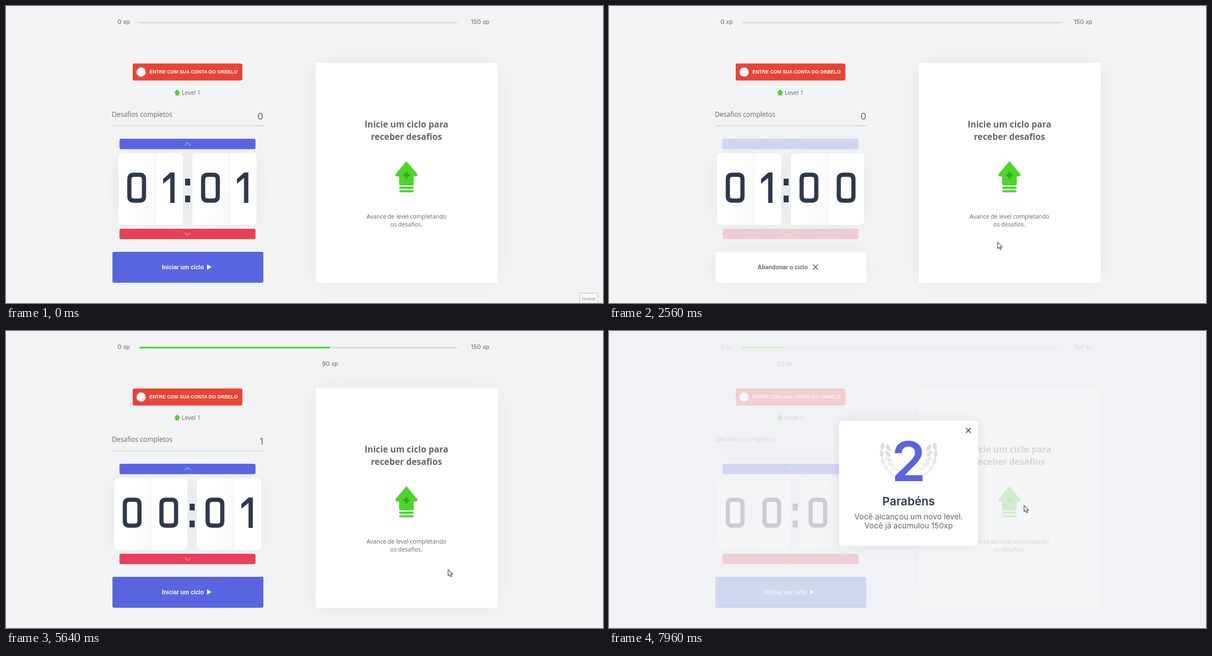
Write an HTML page that moves like this. It is 1060 by 528 pixels and loops after 8 s.

```html
<!DOCTYPE html>
<html lang="pt-BR">
<head>
<meta charset="utf-8">
<title>Ciclos e desafios</title>
<style>
html, body { margin: 0; width: 100%; height: 100%; overflow: hidden; background: #f2f3f5; }
#stage { position: relative; width: 1060px; height: 528px; overflow: hidden; background: #f2f3f5; }
#stage > * { position: absolute; }
#stage > svg { left: 0; top: 0; }
.shadow { box-shadow: 0 0 35px rgba(0, 0, 0, .05); }
#card { left: 549.5px; top: 101px; width: 323.5px; height: 390.5px; background: #fff; }
#cycle { left: 188.5px; top: 436.5px; width: 268.5px; height: 55px; border-radius: 3px; }
#timer { left: 0; top: 262px; width: 645px; height: 126.5px; display: flex; justify-content: center; }
.pair { display: flex; border-radius: 7px; background: #fff; overflow: hidden; }
.cell { position: relative; height: 100%; width: 65px; box-sizing: border-box; }
.cell.one { width: 48.75px; }
.cell:first-child { background: linear-gradient(100deg, #fff 45%, #f8f8f9); }
.cell + .cell { border-left: 1px solid #eeeff1; }
.cell svg { position: absolute; top: 34px; left: 15px; overflow: visible; }
.cell + .cell svg { left: 14.5px; }
.cell.one svg { left: 12.5px; }
.colon { position: relative; width: 17.3px; }
.colon i { position: absolute; left: 4.4px; width: 8.5px; height: 12px; background: #2e384d; }
text { font-family: "Open Sans", "Noto Sans", sans-serif; fill: #666; }
.inter { font-family: Inter, sans-serif; }
.arial { font-family: "Liberation Sans", Arial, sans-serif; font-weight: bold; }
.mid { text-anchor: middle; }
.end { text-anchor: end; }
</style>
</head>
<body>
<div id="stage">
  <div id="card" class="shadow"></div>
  <div id="timer"></div>
  <div id="cycle"></div>

  <svg width="1060" height="528">
    <defs>
      <g id="arrowUp">
        <path d="M20 1.5L38.5 23.5Q39 26 36.5 26H32V40Q32 42 30 42H10Q8 42 8 40V26H3.5Q1 26 1.5 23.5Z" fill="#4cd62b" stroke="#4cd62b" stroke-width="2" stroke-linejoin="round"/>
      </g>
    </defs>

    <text class="inter" font-size="11" x="198" y="32">0 <tspan font-size="10">xp</tspan></text>
    <text class="inter end" font-size="11" x="858" y="32">150 <tspan font-size="10">xp</tspan></text>
    <rect x="236.5" y="28" width="564.5" height="3" rx="1.5" fill="#dcdde0"/>
    <rect id="bar" x="236.5" y="28" height="3" rx="1.5" fill="#4cd62b"/>
    <text id="gain" class="inter mid" font-size="11" y="61.5"><tspan id="gainNum"></tspan> <tspan font-size="10">xp</tspan></text>

    <rect x="225" y="102.3" width="194.7" height="30.3" rx="3" fill="#ea4335"/>
    <circle cx="240" cy="117.5" r="8.2" fill="#fff"/>
    <text class="arial" font-size="8.5" x="254.8" y="120" style="fill:#fff">ENTRE COM SUA CONTA DO ORBELO</text>

    <use href="#arrowUp" transform="translate(298.8 147.8) scale(.26)"/>
    <text id="level" font-size="10.4" x="312" y="158"></text>

    <text font-size="11.75" x="188" y="196.5">Desafios completos</text>
    <text id="count" class="inter end" font-size="16.5" x="457" y="202"></text>
    <path d="M188 213H457" stroke="#c6c7ca" stroke-width="1.2"/>

    <g id="steps">
      <rect x="201.5" y="236" width="241.5" height="18.5" rx="3" fill="#5965e0"/>
      <path d="M317.5 247.8L322.3 243L327.1 247.8" fill="none" stroke="#3ec8f2" stroke-width="1.6"/>
      <rect x="201.5" y="396" width="241.5" height="18.5" rx="3" fill="#e83f5b"/>
      <path d="M317.5 403.3L322.3 408L327.1 403.3" fill="none" stroke="#f5a43c" stroke-width="1.6"/>
    </g>

    <g id="idleLabel">
      <text class="arial" font-size="10.2" x="277" y="467.5" style="fill:#fff">Iniciar um ciclo</text>
      <path d="M357 459.3L365 464L357 468.7Z" fill="#fff"/>
    </g>
    <g id="activeLabel">
      <text class="arial" id="quit" font-size="10.2" x="264" y="467.5">Abandonar o ciclo</text>
      <path id="quitX" d="M362.3 459.8L371 468.5M371 459.8L362.3 468.5" stroke-width="1.6"/>
    </g>
    <g id="doneLabel">
      <rect x="188.5" y="491" width="268.5" height="3" fill="#4cd62b"/>
      <text class="arial" font-size="10.2" x="270" y="467.5">Ciclo encerrado</text>
      <circle cx="363" cy="464" r="5.5" fill="#4cd62b"/>
      <path d="M360.3 464.2L362.3 466.2L365.8 462" fill="none" stroke="#fff" stroke-width="1.3"/>
    </g>

    <g id="waiting">
      <g font-size="15.4" font-weight="bold" class="mid">
        <text x="711" y="215.7">Inicie um ciclo para</text>
        <text x="711" y="237.7">receber desafios</text>
      </g>
      <use href="#arrowUp" x="691" y="276"/>
      <path d="M711 295.5V306.5M705.5 301H716.5" stroke="#36a81e" stroke-width="4"/>
      <path d="M700 323H722M700 329.3H722" stroke="#4cd62b" stroke-width="3.8" stroke-linecap="round"/>
      <g font-size="10.45" class="mid">
        <text x="711" y="377.5">Avance de level completando</text>
        <text x="711" y="391.8">os desafios.</text>
      </g>
    </g>

    <g id="challenge" class="mid">
      <text id="prize" class="inter" font-size="13" font-weight="600" x="711" y="170" style="fill:#5965e0"></text>
      <path d="M580 187H842" stroke="#dcdde0"/>
      <path d="M694 234H728" stroke="#4cd62b" stroke-width="5"/>
      <path d="M692 219V249M730 219V249" stroke="#4cd62b" stroke-width="8" stroke-linecap="round"/>
      <path d="M683 227V241M739 227V241" stroke="#36a81e" stroke-width="5" stroke-linecap="round"/>
      <text font-size="15.4" font-weight="bold" x="711" y="288">Novo desafio</text>
      <g font-size="10.45">
        <text x="711" y="314">Estique um de seus braços com a palma</text>
        <text x="711" y="329">da mão virada para frente e puxe os</text>
        <text x="711" y="344">dedos para cima por 10 segundos.</text>
      </g>
      <rect x="580" y="406" width="127" height="27" rx="3" fill="#e83f5b"/>
      <rect x="715" y="406" width="127" height="27" rx="3" fill="#4cd62b"/>
      <g font-size="9.5">
        <text class="arial" x="643.5" y="423" style="fill:#fff">Falhei</text>
        <text class="arial" x="778.5" y="423" style="fill:#fff">Completei</text>
      </g>
    </g>

    <g id="tip">
      <rect x="1018.5" y="510.5" width="32.5" height="22" rx="1" fill="#f7f7f8" stroke="#c4c4c6"/>
      <text x="1022.8" y="523" font-size="8" class="arial" style="font-weight:normal;fill:#8a8a8a">Gravar</text>
    </g>
  </svg>

  <svg width="1060" height="528">
    <g id="modal">
      <rect width="1060" height="528" fill="#f2f3f5" opacity=".8"/>
      <rect x="408.5" y="159.5" width="247" height="222.5" rx="6" fill="#fff" style="filter:drop-shadow(0 0 9px rgba(0,0,0,.09))"/>
      <path d="M633.8 172.3L642.6 181.1M642.6 172.3L633.8 181.1" stroke="#555" stroke-width="1.6"/>
      <g id="laurel"></g>
      <g class="mid">
        <text class="inter" x="532" y="267" font-size="98" font-weight="600" style="fill:#5965e0">2</text>
        <text class="inter" x="532" y="310" font-size="20.5" font-weight="600" style="fill:#2e384d">Parabéns</text>
        <text class="inter" x="532" y="334.7" font-size="13.7">Você alcançou um novo level.</text>
        <text class="inter" x="532" y="351.3" font-size="13.7">Você já acumulou 150xp</text>
      </g>
    </g>
    <g id="cursor" stroke-linejoin="round">
      <path id="arrow" d="M0 0V11.4L2.7 9L4.6 13L6.5 12.1L4.6 8.3H8.3Z" fill="#fff" stroke="#222"/>
      <path id="hand" d="M-1.4 9V1.2Q-1.2 0 0 0T1.3 1.2V5.4Q2.6 4.6 3.6 5.8Q5 5.2 5.7 6.5Q7.3 6.1 7.3 8V11Q7.3 13 6 15.8H-1.2Q-2 13.2-4.6 10.4Q-5.4 8.6-3.6 8.3Q-2.4 8.2-1.4 9Z" fill="#fff" stroke="#222"/>
    </g>
  </svg>
</div>

<script>
const LOOP = 8000, STEP = 40;
const $ = id => document.getElementById(id);
const show = (id, on) => { $(id).style.display = on ? "" : "none"; };

const BLUE = [89, 101, 224], RED = [232, 63, 91], WHITE = [255, 255, 255];

// time, mode, clock, completed, xp
const STATES = [
  [0, "idle", "01:01", 0, 0],
  [600, "active", "01:01", 0, 0],
  [1600, "active", "01:00", 0, 0],
  [2920, "active", "00:59", 0, 0],
  [3280, "idle", "01:01", 0, 0],
  [3640, "idle", "00:01", 0, 0],
  [3800, "active", "00:01", 0, 0],
  [4800, "done", "00:00", 0, 0],
  [5440, "idle", "00:01", 1, 90],
  [6280, "active", "00:01", 1, 90],
  [7280, "done", "00:00", 1, 90],
  [7760, "levelup", "00:01", 2, 20]
];

// time, colour of the cycle button
const FILL = [
  [600, BLUE], [800, RED], [1110, RED], [1290, WHITE],
  [2960, WHITE], [3120, RED], [3280, RED], [3420, BLUE],
  [3800, BLUE], [3960, RED], [4020, RED], [4190, WHITE],
  [5439, WHITE], [5440, BLUE], [6280, BLUE], [6440, RED],
  [6560, RED], [6740, WHITE], [7759, WHITE], [7760, BLUE]
];

// time, cursor tip
const PATH = [
  [80, [1000, 490]], [200, [820, 400]], [320, [560, 367]], [440, [360, 452]],
  [960, [360, 452]], [1100, [450, 430]], [1200, [832, 270]], [1240, [829.5, 247]],
  [1400, [818, 244]], [1960, [762, 457]], [2200, [762, 457]], [2240, [770, 456]],
  [2480, [770, 456]], [2600, [650, 402]], [2720, [480, 440]], [2880, [480, 440]],
  [3040, [380, 456]], [3280, [346, 458]], [3440, [344, 456]], [3560, [322, 402]],
  [3680, [322, 402]], [3800, [345, 456]], [3960, [380, 452]], [4040, [470, 440]],
  [4240, [857, 360]], [4440, [968, 330]], [4560, [919, 345]], [4600, [919, 345]],
  [5200, [787, 422]], [5640, [785, 424]], [6240, [350, 456]], [6480, [380, 452]],
  [6560, [465, 440]], [6720, [853, 400]], [6880, [804, 410]], [7080, [800, 418]],
  [7480, [786, 420]], [7720, [786, 420]], [7960, [737, 310]]
];

function track(keys, t) {
  const i = keys.findIndex(k => k[0] > t);
  if (i === 0) return keys[0][1];
  if (i < 0) return keys[keys.length - 1][1];
  const [t0, a] = keys[i - 1], [t1, b] = keys[i];
  return a.map((v, n) => v + (b[n] - v) * (t - t0) / (t1 - t0));
}
const rgb = c => `rgb(${c.map(Math.round)})`;

const STROKES = {
  0: "M4 12Q4 4 12 4H22Q30 4 30 12V42Q30 50 22 50H12Q4 50 4 42Z",
  5: "M30 4H5V25Q10 21 18 21Q30 21 30 33V39Q30 50 19 50H14Q5 50 4 41",
  9: "M30 25Q27 30 18 30H14Q4 30 4 19V14Q4 4 14 4H20Q30 4 30 14V28Q30 38 24 50"
};
function digit(d) {
  const shape = d === "1"
    ? '<path d="M0 11.5L13 0H20.3V54H12.6V9.8L0 20Z" fill="#2e384d"/>'
    : `<path d="${STROKES[d]}" fill="none" stroke="#2e384d" stroke-width="7.4"/>`;
  return `<div class="cell${d === "1" ? " one" : ""}"><svg width="34" height="54">${shape}</svg></div>`;
}
let shown = "";
function drawClock(clock) {
  if (clock === shown) return;
  shown = clock;
  const [m, s] = clock.split(":").map(p => `<div class="pair shadow">${[...p].map(digit).join("")}</div>`);
  $("timer").innerHTML = m + '<div class="colon"><i style="top:45px"></i><i style="top:75px"></i></div>' + s;
}

function drawLaurel() {
  let leaves = "";
  for (const side of [-1, 1])
    for (const [radius, tilt] of [[48, -8], [37, 28]])
      for (let i = 0; i < 5; i++) {
        const a = (-14 + i * 16) * Math.PI / 180;
        const x = 532 + side * radius * Math.cos(a), y = 217 + radius * Math.sin(a);
        const shade = 218 + i * 6;
        leaves += `<path d="M0-8Q7 0 0 7Q-7 0 0-8Z" fill="${rgb([shade, shade, shade + 1])}" transform="translate(${x} ${y}) rotate(${side * (tilt + i * 13)})"/>`;
      }
  $("laurel").innerHTML = leaves;
}

const inside = (x, y, l, t, r, b) => x > l && x < r && y > t && y < b;
function clickable(x, y, mode) {
  if (mode === "levelup") return false;
  if (mode === "done") return inside(x, y, 580, 406, 842, 433);
  return inside(x, y, 188, 436, 457, 492) ||
    mode === "idle" && (inside(x, y, 201, 396, 443, 415) || inside(x, y, 201, 236, 443, 255));
}

function draw(t) {
  const [, mode, clock, count, xp] = STATES.filter(s => s[0] <= t).pop();
  const levelUp = mode === "levelup", idle = mode === "idle" || levelUp;

  drawClock(clock);
  const width = 564.5 * xp / 150;
  $("bar").setAttribute("width", width);
  $("gain").setAttribute("x", 236.5 + width);
  $("gainNum").textContent = xp;
  show("gain", xp > 0);
  $("level").textContent = "Level " + (levelUp ? 2 : 1);
  $("count").textContent = count;

  const fill = track(FILL, t);
  $("cycle").style.background = rgb(fill);
  $("cycle").className = idle ? "" : "shadow";
  const grey = 255 - 153 * Math.max(0, (fill[1] - 101) / 154);
  const ink = rgb([grey, grey, grey]);
  $("quit").style.fill = $("quitX").style.stroke = ink;
  $("steps").style.opacity = idle ? 1 : .2;

  show("idleLabel", idle);
  show("activeLabel", mode === "active");
  show("doneLabel", mode === "done");
  show("waiting", mode !== "done");
  show("challenge", mode === "done");
  $("prize").textContent = `Ganhe ${count ? 80 : 90} xp`;
  show("modal", levelUp);
  show("tip", t < 80);

  const [x, y] = track(PATH, t), hand = clickable(x, y, mode);
  show("cursor", t >= 80);
  show("hand", hand);
  show("arrow", !hand);
  $("cursor").setAttribute("transform", `translate(${x} ${y})`);
}

drawLaurel();
const start = performance.now();
function tick() {
  const t = (performance.now() - start) % LOOP;
  draw(Math.floor(t / STEP) * STEP);
  requestAnimationFrame(tick);
}
tick();
</script>
</body>
</html>
```
